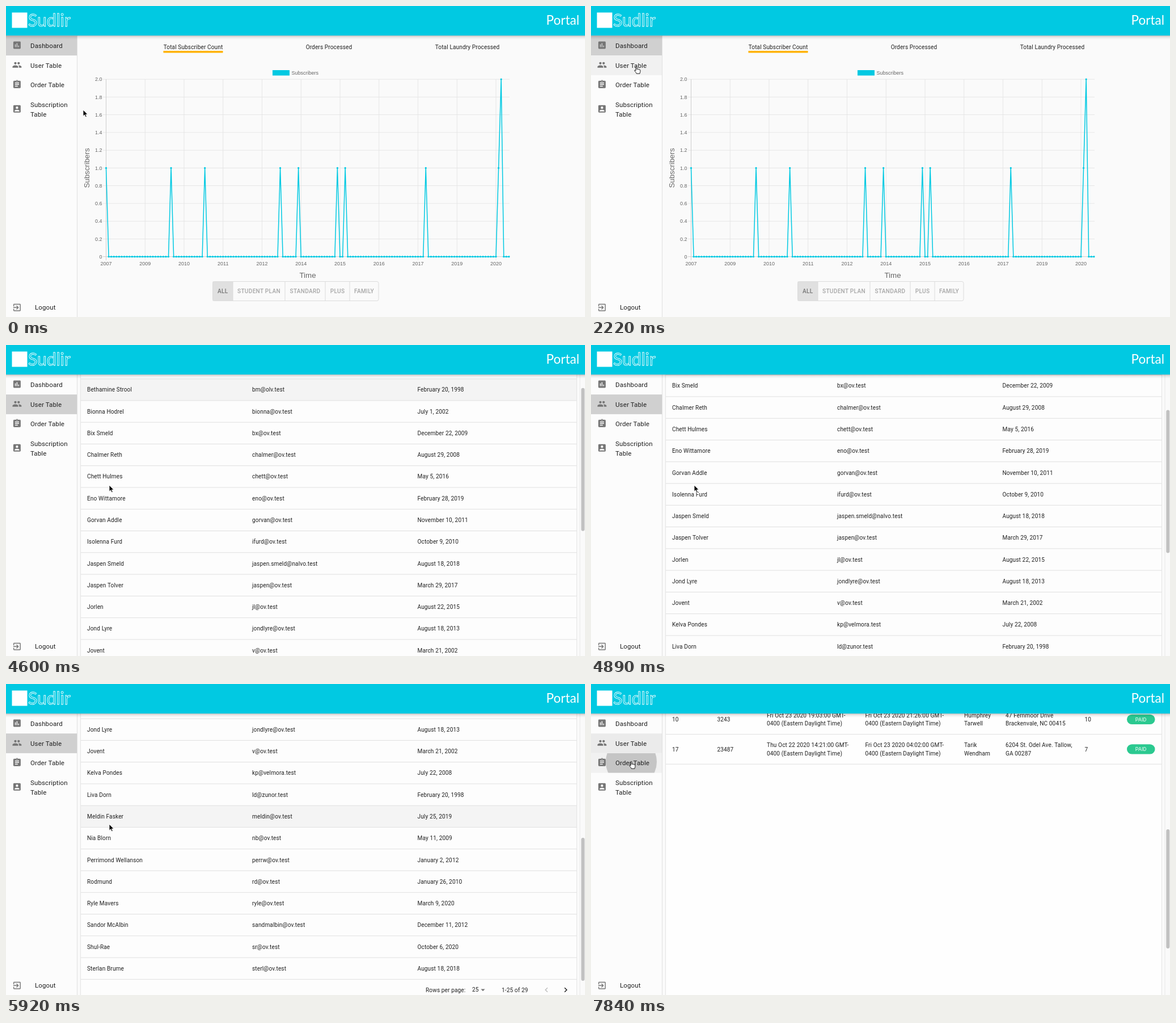
These frames come from a looping animation (1021x548 px, 7.99 s). An HTML page:

```html
<!DOCTYPE html>
<html lang="en">
<head>
<meta charset="utf-8">
<title>Portal</title>
<style>
html, body { margin: 0; width: 100%; height: 100%; overflow: hidden; background: #fafafa; }
svg { display: block; }
text { font: 10.11px Roboto, sans-serif; letter-spacing: .0107em; fill: #212121; white-space: pre; }
.nav { font-size: 11.55px; letter-spacing: .0094em; }
.title { font-size: 14.44px; font-weight: 500; letter-spacing: .0075em; }
.head { font-weight: 500; }
.muted { fill: #757575; }
.button { font-weight: 500; letter-spacing: .0286em; fill: #a6a6a6; }
.on { fill: #757575; }
.chart { font: 9px "Liberation Sans", Arial, sans-serif; letter-spacing: 0; fill: #666; }
.axis { font-size: 13.3px; }
.chip { font-size: 9px; fill: #fff; }
.portal { font: 22.5px Lato, sans-serif; letter-spacing: 0; fill: #fff; }
.brand { font: 30px Lato, sans-serif; letter-spacing: 0; fill: none; stroke: #fff; stroke-width: .9; }
.mid { text-anchor: middle; }
.end { text-anchor: end; }
</style>
</head>
<body>
<svg id="stage" width="1021" height="548" viewBox="0 0 1021 548"></svg>
<script>
const LOOP = 7990, CYAN = '#01c9e2', ROW = 38.27, ROWS_TOP = 145.6;
const OPEN_USERS = 3120, OPEN_ORDERS = 7840;

const text = (x, y, s, cls = '', size = 10.11) =>
  `<text x="${x}" y="${y + size * .36}" class="${cls}">${s}</text>`;
const rect = (x, y, w, h, fill, extra = '') =>
  `<rect x="${x}" y="${y}" width="${w}" height="${h}" fill="${fill}" ${extra}/>`;
const icon = (d, x, y, size = 17.3, fill = '#757575') =>
  `<path d="${d}" fill="${fill}" transform="translate(${x - size / 2} ${y - size / 2}) scale(${size / 24})"/>`;
const rule = y => rect(132, y - .5, 874, 1, '#e0e0e0');

const ICONS = {
  chart: 'M19 3H5c-1.1 0-2 .9-2 2v14c0 1.1.9 2 2 2h14c1.1 0 2-.9 2-2V5c0-1.1-.9-2-2-2zM9 17H7v-7h2zm4 0h-2V7h2zm4 0h-2v-4h2z',
  people: 'M16 11a3 3 0 1 0 0-6a3 3 0 0 0 0 6zM8 11a3 3 0 1 0 0-6a3 3 0 0 0 0 6zm0 2c-2.33 0-7 1.17-7 3.5V19h14v-2.5c0-2.33-4.67-3.5-7-3.5zm8 0l-.97.05c1.16.84 1.97 1.97 1.97 3.45V19h6v-2.5c0-2.33-4.67-3.5-7-3.5z',
  list: 'M19 3h-4.18a3 3 0 0 0-5.64 0H5c-1.1 0-2 .9-2 2v14c0 1.1.9 2 2 2h14c1.1 0 2-.9 2-2V5c0-1.1-.9-2-2-2zm-7 0a1 1 0 1 1 0 2a1 1 0 0 1 0-2zm2 14H7v-2h7zm3-4H7v-2h10zm0-4H7V7h10z',
  account: 'M3 5v14c0 1.1.9 2 2 2h14c1.1 0 2-.9 2-2V5c0-1.1-.9-2-2-2H5c-1.1 0-2 .9-2 2zm12 4a3 3 0 1 1-6 0a3 3 0 0 1 6 0zm-9 8c0-2 4-3.1 6-3.1s6 1.1 6 3.1v1H6z',
  exit: 'M10.09 15.59L11.5 17l5-5-5-5-1.41 1.41L12.67 11H3v2h9.67zM19 3H5c-1.1 0-2 .9-2 2v4h2V5h14v14H5v-4H3v4c0 1.1.9 2 2 2h14c1.1 0 2-.9 2-2V5c0-1.1-.9-2-2-2z',
  up: 'M4 12l1.41 1.41L11 7.83V20h2V7.83l5.58 5.59L20 12l-8-8z',
  drop: 'M7 10l5 5 5-5z',
  prev: 'M15.41 7.41L14 6l-6 6 6 6 1.41-1.41L10.83 12z',
  next: 'M10 6L8.59 7.41 13.17 12l-4.58 4.59L10 18l6-6z'
};

function dashboard() {
  const X0 = 176.5, Y0 = 441.7, UNIT = 156.3, MONTH = 68.75 / 15;
  const peaks = { 0: 1, 25: 1, 38: 1, 67: 1, 74: 1, 89: 1, 92: 1, 123: 1, 151: 1, 152: 2 };
  let s = text(330, 72, 'Total Subscriber Count', 'mid') + rect(277.5, 79, 105, 3.5, '#ffb300') +
    text(569.5, 72, 'Orders Processed', 'mid') + text(813.5, 72, 'Total Laundry Processed', 'mid') +
    rect(470, 113, 30, 9.5, CYAN) + text(503.5, 117.8, 'Subscribers', 'chart', 9);
  for (let i = 0; i <= 10; i++) {
    const y = Y0 - i * UNIT / 5;
    s += rect(171, y - .4, 717, .8, i ? '#e2e2e2' : '#c4c4c4') +
      text(169.5, y, i ? (i / 5).toFixed(1) : '0', 'chart end', 9);
  }
  [2007, 2009, 2010, 2011, 2012, 2014, 2015, 2016, 2017, 2019, 2020].forEach((year, i) => {
    const x = X0 + i * 68.75;
    s += rect(x - .4, 129, .8, 319, i ? '#e2e2e2' : '#c4c4c4') + text(x, 454, year, 'chart mid', 9);
  });
  const pts = Array.from({ length: 156 }, (_, i) => [X0 + i * MONTH, Y0 - (peaks[i] || 0) * UNIT]);
  s += `<polyline points="${pts.join(' ')}" fill="none" stroke="${CYAN}" stroke-width="1.5" stroke-linejoin="round"/>`;
  s += pts.map(([x, y]) => `<circle cx="${x}" cy="${y}" r="1.6" fill="${CYAN}"/>`).join('');
  s += `<g transform="translate(142.5 285.5) rotate(-90)">${text(0, 0, 'Subscribers', 'chart axis mid', 13.3)}</g>`;
  s += text(532, 474, 'Time', 'chart axis mid', 13.3);

  const edges = [364.5, 400, 492, 563, 606, 657];
  s += rect(364.5, 485.5, 35.5, 34, '#e0e0e0') +
    rect(364.5, 485.5, 292.5, 34, 'none', 'rx="3" stroke="#dcdcdc"');
  ['ALL', 'STUDENT PLAN', 'STANDARD', 'PLUS', 'FAMILY'].forEach((name, i) => {
    if (i) s += rect(edges[i] - .5, 485.5, 1, 34, '#dcdcdc');
    s += text((edges[i] + edges[i + 1]) / 2, 502.7, name, 'button mid' + (i ? '' : ' on'));
  });
  return s;
}

const PEOPLE = `Abi Joren|abi|March 31, 2018
Audrin Holt|audrin|August 17, 2016
Bethamine Strool|bm@olv.test|February 20, 1998
Bionna Hodrel|bionna|July 1, 2002
Bix Smeld|bx|December 22, 2009
Chalmer Reth|chalmer|August 29, 2008
Chett Hulmes|chett|May 5, 2016
Eno Wittamore|eno|February 28, 2019
Gorvan Addle|gorvan|November 10, 2011
Isolenna Furd|ifurd|October 9, 2010
Jaspen Smeld|jaspen.smeld@nalvo.test|August 18, 2018
Jaspen Tolver|jaspen|March 29, 2017
Jorlen|jl|August 22, 2015
Jond Lyre|jondlyre|August 18, 2013
Jovent|v|March 21, 2002
Kelva Pondes|kp@velmora.test|July 22, 2008
Liva Dorn|ld@zunor.test|February 20, 1998
Meldin Fasker|meldin|July 25, 2019
Nia Blorn|nb|May 11, 2009
Perrimond Wellanson|perrw|January 2, 2012
Rodmund|rd|January 26, 2010
Ryle Mavers|ryle|March 9, 2020
Sandor McAlbin|sandmalbin|December 11, 2012
Shul-Rae|sr|October 6, 2020
Sterlan Brume|sterl|August 18, 2018`.split('\n').map(line => line.split('|'));

function userTable() {
  let s = rect(131.5, 58, 875, 1082, '#fdfdfd', 'rx="3" stroke="#e4e4e4"') +
    rect(132, ROWS_TOP, 874, ROW, '#f4f4f4', 'id="rowHover"') +
    text(571.5, 81, 'User Table', 'title mid', 14.44) +
    text(143, 125, 'Username', 'head') + icon(ICONS.up, 199, 125, 13) +
    text(434, 125, 'Email', 'head muted') + text(725.5, 125, 'Account Created Date', 'head muted') +
    rule(ROWS_TOP);
  PEOPLE.forEach(([name, mail, date], i) => {
    const y = ROWS_TOP + (i + .5) * ROW;
    s += text(143, y, name) + text(434, y, mail.includes('@') ? mail : mail + '@ov.test') +
      text(725.5, y, date) + rule(y + ROW / 2);
  });
  return s + text(740, 1121, 'Rows per page:') + text(822, 1120.7, '25') +
    icon(ICONS.drop, 841, 1121) + text(874, 1121, '1-25 of 29') +
    icon(ICONS.prev, 953, 1121, 17.3, '#bdbdbd') + icon(ICONS.next, 987, 1121, 17.3, '#212121');
}

function orderTable() {
  const zone = '0400 (Eastern Daylight Time)';
  const columns = [143, 222.5, 310, 483.5, 658, 731, 870.5];
  const orders = [
    ['10', '3243', ['Fri Oct 23 2020 19:03:00 GMT-', zone], ['Fri Oct 23 2020 21:26:00 GMT-', zone],
      ['Humphrey', 'Tarwell'], ['47 Fernmoor Drive', 'Brackenvale, NC 00415'], '10'],
    ['17', '23487', ['Thu Oct 22 2020 14:21:00 GMT-', zone], ['Fri Oct 23 2020 04:02:00 GMT-', zone],
      ['Tarik', 'Wendham'], ['6204 St. Odel Ave. Tallow,', 'GA 00287'], '7']
  ];
  let s = rect(131.5, 40, 875, 520, '#fefefe', 'stroke="#e4e4e4"');
  orders.forEach((order, r) => {
    const y = 62.3 + r * 52.6;
    order.forEach((cell, c) => {
      s += Array.isArray(cell)
        ? text(columns[c], y - 7.2, cell[0]) + text(columns[c], y + 7.3, cell[1])
        : text(columns[c], y, cell);
    });
    s += rect(945, y - 8.6, 49.5, 17.3, '#2bc990', 'rx="8.65"') +
      text(969.7, y, 'PAID', 'chip mid', 9) + rule(y + 26.3);
  });
  return s;
}

const NAV = [52.5, 87.2, 121.9, 156.5, 208];
function sidebar() {
  let s = rect(0, 52, 125, 496, '#fcfcfc');
  for (let i = 0; i < 4; i++) s += rect(0, NAV[i], 125, NAV[i + 1] - NAV[i], 'none', 'class="item"');
  s += `<clipPath id="itemClip">${rect(0, 0, 125, 34.6, '#000', 'id="itemBox"')}</clipPath>
    <g clip-path="url(#itemClip)"><circle id="ripple"/></g>`;
  const entry = (x, y, name) => text(x, y, name, 'nav', 11.55);
  return s + icon(ICONS.chart, 19.4, 69) + entry(43, 70, 'Dashboard') +
    icon(ICONS.people, 19.4, 103.7) + entry(43, 104.5, 'User Table') +
    icon(ICONS.list, 19.4, 138.3) + entry(43, 139.2, 'Order Table') +
    icon(ICONS.account, 19.4, 181.3) + entry(43, 173.8, 'Subscription') + entry(43, 191.1, 'Table') +
    icon(ICONS.exit, 19.4, 531.3) + entry(51, 531.3, 'Logout') + rect(125, 52, 1, 496, '#e0e0e0');
}

const $ = id => document.getElementById(id);
$('stage').innerHTML = `
  <linearGradient id="shade" x2="0" y2="1">
    <stop stop-color="#000" stop-opacity=".24"/><stop offset=".4" stop-color="#000" stop-opacity=".08"/>
    <stop offset="1" stop-color="#000" stop-opacity="0"/>
  </linearGradient>
  ${rect(0, 0, 1021, 548, '#fafafa')}
  <g id="view0">${dashboard()}</g>
  <g id="view1">${userTable()}</g>
  <g id="view2">${orderTable()}</g>
  <g id="bar">${rect(1012, 0, 9, 548, '#fafafa') + rect(1011.5, 0, 1, 548, '#e8e8e8')}
    ${rect(1014.3, 0, 6, 252, '#c1c1c1', 'id="thumb" rx="3"')}</g>
  ${sidebar()}
  ${rect(0, 52, 1021, 7, 'url(#shade)') + rect(0, 0, 1021, 52, CYAN)}
  ${rect(10.5, 11.5, 27, 27, '#fff')}
  <text x="39" y="36" class="brand">Sudlir</text>
  <text x="1011" y="32.5" class="portal end">Portal</text>
  <path id="arrow" d="M0 0V11.2L2.6 8.8L4.4 12.8L6.3 12L4.6 8.1H8.1Z" fill="#000" stroke="#fff" stroke-width=".9"/>
  <path id="hand" d="M-1 1C-1-.3 1-.3 1 1V5C1.3 4 2.9 4.1 3 5.3C3.4 4.5 4.9 4.7 5 5.9C5.5 5.2 6.9 5.5 6.9 6.8V9.2C6.9 10.6 6 11 6 12.6H.2C0 11-2.6 8.9-3.2 7.4C-3.5 6.3-2.2 6-1 7.6Z"
    fill="#fff" stroke="#000" stroke-width=".9" stroke-linejoin="round"/>`;

// Tracks hold each value until the next entry: [time, ...values].
const POINTER = [
  [0, 136, 183], [450, 138, 170], [600, 142, 148], [750, 145, 122], [900, 143, 100], [1040, 126, 86],
  [1190, 104, 83], [1330, 88, 81], [1630, 86, 83], [1780, 83, 89], [1930, 81, 96], [2070, 80, 102],
  [2220, 80, 106.5], [3270, 84, 110], [3410, 98, 124], [3560, 118, 146], [3710, 148, 171],
  [3860, 172, 218], [4010, 182, 247], [6960, 180, 243], [7110, 168, 224], [7260, 146, 196],
  [7400, 116, 168], [7550, 92, 150], [7700, 76, 140], [7840, 71, 136.5]
];
const SCROLL = [
  [0, 0], [4310, 28], [4460, 88], [4600, 162.5], [4750, 246], [4900, 322], [5040, 385], [5190, 452],
  [5330, 501], [5470, 530], [5620, 556], [5770, 572], [5920, 582], [6070, 606], [6360, 636]
];
const ROW_HOVER = [[0, -1], [3860, 1], [4010, 2], [5040, 12], [5920, 17], [6360, 19], [7110, 18], [7260, 17], [7400, -1]];

const indexAt = (track, t) => track.findLastIndex(entry => entry[0] <= t);
const valueAt = (track, t) => track[indexAt(track, t)][1];
const navAt = ([, x, y]) => x < 125 ? NAV.findLastIndex((top, i) => i < 4 && y >= top && y < NAV[i + 1]) : -1;
const show = (id, on) => $(id).setAttribute('display', on ? 'inline' : 'none');
const set = (el, attrs) => { for (const k in attrs) el.setAttribute(k, attrs[k]); };
const items = document.querySelectorAll('.item');

function itemColor(i, t, view, over, before) {
  const clicking = view && t - (view === 1 ? OPEN_USERS : OPEN_ORDERS) < 150;
  if (clicking && i === view - 1) return '#ebebeb';
  if (i === view && !clicking) return view === 1 && t < 3860 ? '#dadada' : '#d0d0d0';
  return i === over ? '#f1f1f1' : i === before ? '#f4f4f4' : 'none';
}

function draw(t) {
  const view = t < OPEN_USERS ? 0 : t < OPEN_ORDERS ? 1 : 2;
  const p = indexAt(POINTER, t), [, x, y] = POINTER[p];
  const over = navAt(POINTER[p]);
  const before = p && t - POINTER[p][0] < 150 ? navAt(POINTER[p - 1]) : -1;
  const scroll = valueAt(SCROLL, t), row = valueAt(ROW_HOVER, t);

  for (let i = 0; i < 3; i++) show('view' + i, i === view);
  show('bar', view);
  set($('view1'), { transform: `translate(0 ${-scroll})` });
  set($('thumb'), view === 2 ? { y: 256, height: 210 } : { y: scroll * .4655, height: 252 });
  show('rowHover', row >= 0);
  set($('rowHover'), { y: ROWS_TOP + row * ROW });
  items.forEach((el, i) => el.setAttribute('fill', itemColor(i, t, view, over, before)));

  const age = t - (view === 1 ? OPEN_USERS : OPEN_ORDERS);
  show('ripple', view && age < 290);
  set($('itemBox'), { y: NAV[view] });
  set($('ripple'), {
    cx: view === 1 ? 80 : 71, cy: view === 1 ? 106 : 137,
    r: age < 150 ? 45 : 125, 'fill-opacity': age < 150 ? .185 : .07
  });

  show('arrow', over < 0);
  show('hand', over >= 0);
  set($(over < 0 ? 'arrow' : 'hand'), { transform: `translate(${x} ${y})` });
}

function tick() {
  draw(performance.now() % LOOP);
  requestAnimationFrame(tick);
}
tick();
</script>
</body>
</html>
```
